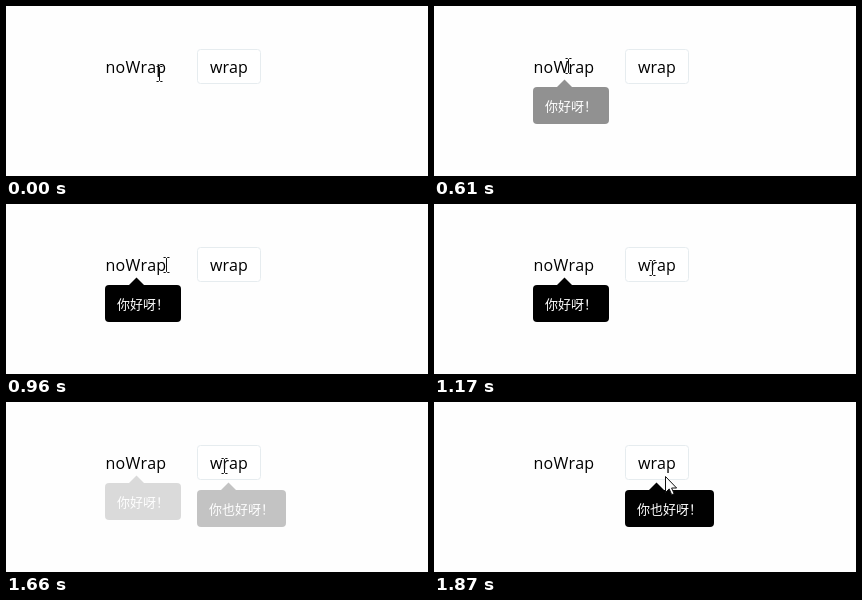
Recreate the animation shown at these times as an HTML page. Size 422 px wide and 170 px high, loop 1940 ms.

```html
<!DOCTYPE html>
<html lang="zh-CN">
<head>
<meta charset="utf-8">
<title>Tooltips</title>
<style>
  html, body { margin: 0; width: 100%; height: 100%; overflow: hidden; background: #fefefe; }
  svg { display: block; width: 100vw; height: 100vh; }
  .label { font: 16px "Open Sans", "Noto Sans", sans-serif; font-kerning: none; fill: #000; }
  .tip text { font: 500 13px "Noto Sans CJK SC", "Noto Sans CJK", sans-serif; fill: #fff; }
</style>
</head>
<body>
<svg viewBox="0 0 422 170">
  <text class="label" x="99.5" y="67" letter-spacing=".2">noWrap</text>
  <rect x="191.5" y="43.5" width="63" height="34" rx="3" fill="#fff" stroke="#e6ecef"/>
  <text class="label" x="204" y="67">wrap</text>
  <g class="tip" id="tip1" transform="translate(99 81)">
    <rect width="76" height="37" rx="4"/>
    <path d="M23.5 .5l8-8 8 8z"/>
    <text x="12" y="23.5">你好呀！</text>
  </g>
  <g class="tip" id="tip2" transform="translate(191 88)">
    <rect width="89" height="37" rx="4"/>
    <path d="M23.5 .5l8-8 8 8z"/>
    <text x="12" y="23.5">你也好呀！</text>
  </g>
  <g id="cursor">
    <path id="beam" d="M-2.5-7.5h2l1 1 1-1h2M.5-6.5v13M-2.5 7.5h2l1-1 1 1h2" fill="none" stroke="#111"/>
    <path id="arrow" d="M.5 .5v16l3.7-3.6 2.5 5.8 2.4-1-2.5-5.7h5z" fill="#fff" stroke="#111" stroke-linejoin="round"/>
  </g>
  <circle id="press" r="12" fill="#fff700"/>
</svg>
<script>
  const LOOP = 1940;
  // The picture is refreshed only at these moments (ms).
  const ticks = [0, 70, 140, 210, 410, 540, 610, 680, 750, 820, 890, 960,
    1030, 1100, 1170, 1520, 1590, 1660, 1730, 1800, 1870];
  // Pointer path: time, x, y
  const path = [[0, 153, 68], [210, 134, 60], [820, 134, 60], [890, 140, 60],
    [1170, 218, 64], [1660, 218, 64], [1870, 231, 74]];
  const $ = id => document.getElementById(id);

  // CSS "ease", cubic-bezier(.25, .1, .25, 1), over 300 ms
  function ease(elapsed) {
    const t = Math.min(1, Math.max(0, elapsed / 300));
    const bezier = (a, b, s) => 3 * a * s * (1 - s) ** 2 + 3 * b * s * s * (1 - s) + s ** 3;
    let low = 0, high = 1;
    for (let i = 0; i < 20; i++) {
      const mid = (low + high) / 2;
      if (bezier(.25, .25, mid) < t) low = mid; else high = mid;
    }
    return t === 1 ? 1 : bezier(.1, 1, low);
  }

  function pointer(t) {
    const next = path.findIndex(p => p[0] > t);
    if (next < 0) return path[path.length - 1].slice(1);
    const [a, b] = [path[next - 1], path[next]];
    const k = (t - a[0]) / (b[0] - a[0]);
    return [1, 2].map(i => Math.round(a[i] + (b[i] - a[i]) * k));
  }

  const fade = (id, opacity) => $(id).setAttribute("opacity", opacity);
  const show = (id, on) => $(id).setAttribute("visibility", on ? "visible" : "hidden");

  function draw(t) {
    const [x, y] = pointer(t);
    const overText = y < 72 && (x < 162 || x > 202);
    $("cursor").setAttribute("transform", `translate(${x} ${y})`);
    show("beam", overText);
    show("arrow", !overText);

    show("press", t >= 410 && t < 540 || t >= 1520 && t < 1660);
    $("press").setAttribute("transform", `translate(${x - 2} ${y - 1})`);
    fade("press", .55);

    fade("tip1", ease(t - 533) - ease(t - 1490));
    fade("tip2", ease(t - 1609));
  }

  function frame() {
    const now = performance.now() % LOOP;
    draw(ticks.filter(t => t <= now).pop());
    requestAnimationFrame(frame);
  }
  frame();
</script>
</body>
</html>
```
